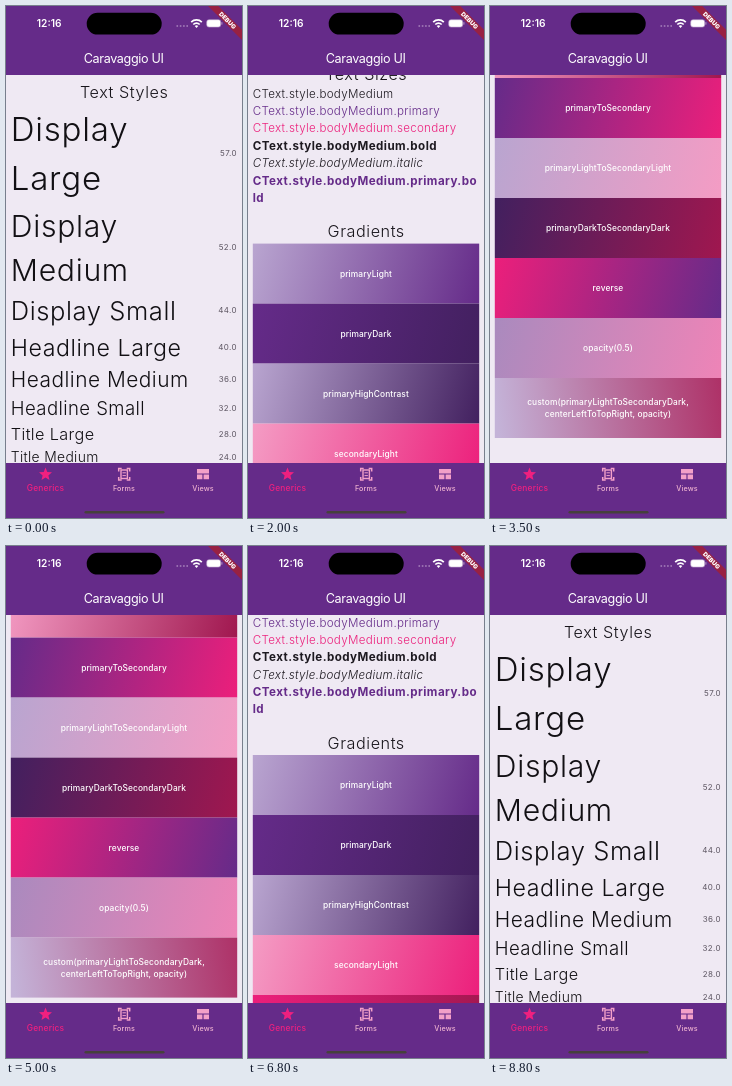
Recreate the animation shown at these times as an HTML page. Size 236 by 512 pixels, loop 8.9 s.

```html
<!DOCTYPE html>
<html lang="en">
<head>
<meta charset="utf-8">
<title>UI kit demo</title>
<style>
  html, body { margin: 0; width: 100%; height: 100%; overflow: hidden; background: #efe9f3; }
  svg { display: block; width: 100vw; height: 100vh; }
  text { font-family: Inter, Roboto, sans-serif; font-optical-sizing: none; white-space: pre; }
  .mid { text-anchor: middle; }
  .title { font-size: 16.2px; font-weight: 350; fill: #18151b; letter-spacing: .034em; }
  .row { font-weight: 350; fill: #121014; letter-spacing: .023em; }
  .size { font-size: 8px; fill: #5c5561; text-anchor: end; letter-spacing: .04em; }
  .body { font-size: 11.6px; font-weight: 350; fill: #1d1920; letter-spacing: .024em; }
  .bold { font-weight: 700; letter-spacing: .037em; }
  .italic { font-style: italic; }
  .primary { fill: #652b89; }
  .secondary { fill: #ec1f7b; }
  .label { font-size: 8.4px; font-weight: 500; fill: #fff; letter-spacing: .1px; }
  .nav { font-size: 7.2px; font-weight: 500; fill: #f0b3d0; letter-spacing: .1px; }
</style>
</head>
<body>
<svg viewBox="0 0 236 512" preserveAspectRatio="none">
  <defs>
    <clipPath id="viewport"><rect y="69" width="236" height="388"/></clipPath>
  </defs>
  <rect width="236" height="512" fill="#efe9f3"/>
  <g clip-path="url(#viewport)"><g id="list"></g></g>

  <rect width="236" height="69" fill="#652b89"/>
  <text x="30.8" y="21" font-size="10.2" font-weight="600" fill="#fff">12:16</text>
  <rect x="80.7" y="6.8" width="75" height="21.8" rx="10.9"/>
  <path d="M170.5 20h12" stroke="#a884bd" stroke-width="1.6" stroke-dasharray="1.6 1.7"/>
  <g fill="none" stroke="#fff" stroke-width="1.7">
    <path d="M185.2 16.2a7.4 7.4 0 0 1 10.6 0M187.3 18.5a4.5 4.5 0 0 1 6.4 0"/>
  </g>
  <path d="M188.7 20a2.6 2.6 0 0 1 3.6 0l-1.8 2z" fill="#fff"/>
  <rect x="200.7" y="13.7" width="14" height="7.4" rx="2.3" fill="#fff" stroke="#b79ac8" stroke-width=".6"/>
  <path d="M215.9 16.2v2.4" stroke="#b79ac8"/>
  <text class="mid" x="117.6" y="57" font-size="12.6" font-weight="400" letter-spacing="-.35" fill="#fff">Caravaggio UI</text>
  <g transform="translate(236 0) rotate(45)">
    <rect x="-25" y="16.8" width="50" height="7.2" fill="#b71c1c" fill-opacity=".63"/>
    <text class="mid" y="22.6" font-size="6.1" font-weight="900" fill="#fff">DEBUG</text>
  </g>

  <rect y="457" width="236" height="55" fill="#652b89"/>
  <path d="M39.5 461.5l1.8 4.4 4.7.4-3.6 3.1 1.1 4.6-4-2.5-4 2.5 1.1-4.6-3.6-3.1 4.7-.4z" fill="#f0207f"/>
  <g fill="none" stroke="#f3a0c8" stroke-width="1.5">
    <path d="M112.7 465.5v-3h3M120.7 462.5h3v3M123.7 471v3h-3M115.7 474h-3v-3"/>
    <rect x="115" y="464" width="6.4" height="8.5" stroke-width="1.4"/>
    <path d="M116.5 466.8h3.4M116.5 469.6h3.4" stroke-width="1"/>
  </g>
  <path d="M191 463h12v4.4h-12zM191 468.6h5.4v4.6h-5.4zM197.6 468.6h5.4v4.6h-5.4z" fill="#f3a0c8"/>
  <text class="mid" x="39.5" y="484.8" font-size="8.4" font-weight="500" letter-spacing=".2" fill="#f0207f">Generics</text>
  <text class="mid nav" x="118" y="484.7">Forms</text>
  <text class="mid nav" x="197" y="484.7">Views</text>
  <rect x="78.5" y="505" width="80" height="2.6" rx="1.3" fill="#46403c"/>
</svg>
<script>
const PURPLE = '#652b89', PINK = '#ec1f7b';
const LILAC = '#b9a5d0', ROSE = '#f49cc4', PLUM = '#42205f', WINE = '#a0174f';
const LOOP = 8900, STEP = 100;
const LEFT = 4.8, RIGHT = 231.2, TILE = 60, TILES_TOP = 776;
const list = document.getElementById('list');

function add(parent, tag, attrs, content = '') {
  const node = document.createElementNS('http://www.w3.org/2000/svg', tag);
  for (const key in attrs) node.setAttribute(key, attrs[key]);
  node.textContent = content;
  return parent.appendChild(node);
}
const text = (content, x, y, cls, extra = {}) =>
  add(list, 'text', { x, y, class: cls, ...extra }, content);
const title = (content, y) => text(content, 118.2, y, 'mid title');

// Type scale: name, logical size, baseline of each line
title('Text Styles', 92.2);
[
  ['Display|Large', 57, 135, 184], ['Display|Medium', 52, 230.5, 275],
  ['Display Small', 44, 314], ['Headline Large', 40, 349.7],
  ['Headline Medium', 36, 381.3], ['Headline Small', 32, 409],
  ['Title Large', 28, 434], ['Title Medium', 24, 456],
  ['Title Small', 20, 475], ['Body Large', 22, 495],
  ['Body Medium', 20, 513.5], ['Body Small', 18, 531],
  ['Label Large', 18, 547], ['Label Medium', 16, 562], ['Label Small', 14, 576]
].forEach(([name, size, ...baselines]) => {
  name.split('|').forEach((line, i) =>
    text(line, LEFT, baselines[i], 'row', { 'font-size': size * .58 }));
  const middle = (baselines[0] + baselines.at(-1)) / 2 - size * .218;
  text(size.toFixed(1), 230.8, middle + 3, 'size');
});

title('Text Sizes', 612);
const style = 'CText.style.bodyMedium';
[
  [style, ''],
  [style + '.primary', 'primary'],
  [style + '.secondary', 'secondary'],
  [style + '.bold', 'bold'],
  [style + '.italic', 'italic'],
  [style + '.primary.bo', 'primary bold'],
  ['ld', 'primary bold']
].forEach(([line, look], i) => text(line, LEFT, 630.2 + i * 17.35, 'body ' + look));

title('Gradients', 769.7);
[
  ['primaryLight', LILAC, PURPLE],
  ['primaryDark', PURPLE, PLUM],
  ['primaryHighContrast', LILAC, PLUM],
  ['secondaryLight', ROSE, PINK],
  ['secondaryDark', PINK, WINE],
  ['secondaryHighContrast', ROSE, WINE],
  ['primaryToSecondary', PURPLE, PINK],
  ['primaryLightToSecondaryLight', LILAC, ROSE],
  ['primaryDarkToSecondaryDark', PLUM, WINE],
  ['reverse', PINK, PURPLE],
  ['opacity(0.5)', '#aa8abe', '#ee84b7'],
  ['custom(primaryLightToSecondaryDark,|centerLeftToTopRight, opacity)', '#c4b3d8', '#ae3167']
].forEach(([name, from, to], i) => {
  const y = TILES_TOP + i * TILE, lines = name.split('|'), rising = lines.length > 1;
  const gradient = add(list, 'linearGradient', {
    id: 'tile' + i, gradientUnits: 'userSpaceOnUse',
    x1: LEFT, y1: rising ? y + TILE / 2 : y, x2: RIGHT, y2: rising ? y : y + TILE
  });
  add(gradient, 'stop', { offset: 0, 'stop-color': from });
  add(gradient, 'stop', { offset: 1, 'stop-color': to });
  add(list, 'rect', { x: LEFT, y, width: RIGHT - LEFT, height: TILE, fill: `url(#tile${i})` });
  lines.forEach((line, n) => text(line, 118, y + (rising ? 27.3 + n * 12 : 33.2), 'mid label'));
});

// Scroll offset over time: two flings down with a bounce, two flings back up
const keys = [
  [0, 0], [1100, 0], [1200, 3], [1400, 60], [1600, 260], [1800, 430], [2000, 538.4],
  [2400, 620], [2700, 670], [3000, 860], [3300, 1040], [3500, 1064], [3800, 1053],
  [4300, 1044.4], [5000, 1044.4], [5300, 900], [5600, 745], [6000, 653],
  [6400, 597], [6800, 567], [7000, 515], [7300, 300], [7600, 90], [7900, -10],
  [8200, -4], [8600, 0], [LOOP, 0]
];
const slope = i => (keys[i + 1][1] - keys[i][1]) / (keys[i + 1][0] - keys[i][0]);
// Harmonic tangents keep the curve from overshooting its keys
function tangent(i) {
  if (i === 0 || i === keys.length - 1) return 0;
  const a = slope(i - 1), b = slope(i);
  return a * b > 0 ? 2 * a * b / (a + b) : 0;
}
function scrollAt(t) {
  const i = keys.findIndex((key, n) => t < keys[n + 1][0]);
  const [t0, s0] = keys[i], [t1, s1] = keys[i + 1], d = t1 - t0, u = (t - t0) / d;
  return s0 + (s1 - s0) * u * u * (3 - 2 * u)
    + d * u * (1 - u) * (tangent(i) * (1 - u) - tangent(i + 1) * u);
}

function draw() {
  const t = Math.floor(performance.now() % LOOP / STEP) * STEP;
  list.setAttribute('transform', `translate(0 ${-scrollAt(t)})`);
  requestAnimationFrame(draw);
}
draw();
</script>
</body>
</html>
```
